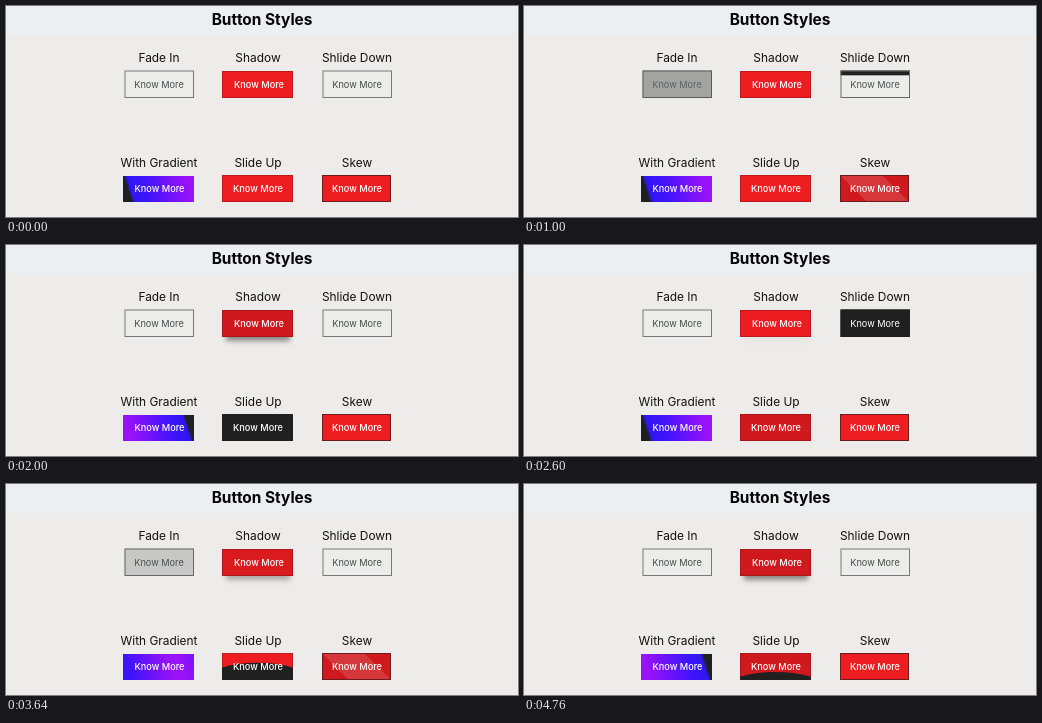
These frames come from a looping animation (512x211 px, 4800 ms). An HTML page with a canvas:

```html
<!DOCTYPE html>
<html lang="en">
<head>
<meta charset="utf-8">
<title>Button Styles</title>
<style>
  html, body { margin: 0; width: 100%; height: 100%; overflow: hidden; background: #edecea; }
  canvas { display: block; width: 512px; height: 211px; }
</style>
</head>
<body>
<canvas id="stage" width="512" height="211"></canvas>
<script>
const ctx = document.getElementById('stage').getContext('2d');
const LOOP = 4800;
const DARK = [31, 32, 31], PAPER = [236, 236, 234], INK = [72, 74, 76], WHITE = [255, 255, 255];
const RED = [237, 29, 33], DEEP_RED = [207, 25, 30], OUTLINE = [118, 121, 122];
const RED_EDGE = 'rgba(110,20,22,0.4)';

const clamp = v => Math.min(1, Math.max(0, v));
const ease = v => v * v * (3 - 2 * v);
const rgb = c => `rgb(${c.join(',')})`;
const mix = (a, b, p) => rgb(a.map((v, i) => Math.round(v + (b[i] - v) * p)));

// Progress of a hover transition; each visit is [enter, leave].
function hover(t, visits, fadeIn, fadeOut = fadeIn) {
  return Math.max(...visits.map(([enter, leave]) =>
    ease(clamp((t - enter) / fadeIn)) * (1 - ease(clamp((t - leave) / fadeOut)))));
}

function text(label, x, y, size, color, weight = 400) {
  ctx.font = `${weight} ${size}px Inter, "Open Sans", sans-serif`;
  ctx.textAlign = 'center';
  ctx.fillStyle = color;
  ctx.fillText(label, x, y);
}

const caption = (x, y, color, weight = 500) => text('Know More', x, y, 9.2, color, weight);

function box(x, y, w, h, fill, edge) {
  ctx.fillStyle = fill;
  ctx.fillRect(x, y, w, h);
  if (edge) border(x, y, w, h, edge);
}

function border(x, y, w, h, color) {
  ctx.strokeStyle = color;
  ctx.lineWidth = 1;
  ctx.strokeRect(x + 0.5, y + 0.5, w - 1, h - 1);
}

function clipped(x, y, w, h, paint) {
  ctx.save();
  ctx.beginPath();
  ctx.rect(x, y, w, h);
  ctx.clip();
  paint();
  ctx.restore();
}

function fadeButton(t) {
  const p = hover(t, [[880, 1650], [3560, 4260]], 300);
  box(118.5, 64.5, 69.5, 27.5, mix(PAPER, DARK, p), mix(OUTLINE, DARK, p));
  caption(153, 82, mix(INK, WHITE, p * p), 400);
}

function shadowButton(t) {
  const p = hover(t, [[1380, 2340], [3480, 5200]], 260, 310);
  ctx.save();
  ctx.shadowColor = `rgba(0,0,0,${0.42 * p})`;
  ctx.shadowBlur = 5;
  ctx.shadowOffsetY = 4;
  box(220, 70, 64, 22, rgb(RED));
  ctx.restore();
  box(216, 65, 71, 27, mix(RED, DEEP_RED, p), RED_EDGE);
  caption(253, 81.7, '#fff');
}

function slideDownButton(t) {
  const p = hover(t, [[937, 1280], [2280, 2740]], 240);
  box(316.5, 64.5, 69.5, 27.5, rgb(PAPER));
  box(316.5, 64.5, 69.5, 27.5 * p, rgb(DARK));
  border(316.5, 64.5, 69.5, 27.5, mix(OUTLINE, DARK, p));
  caption(351, 82, mix(INK, WHITE, p * p), 400);
}

function gradientButton(t) {
  const p = hover(t, [[1170, 2250], [3490, 5200]], 470, 300);
  const x = 117 - 71 * p, lean = 0.32;
  const reach = 142 * Math.cos(lean);
  // Mirrored bands, slanted so that the dark ends lean.
  const bands = [[0, '#1f2024'], [0.033, '#1f2024'], [0.055, '#3016f2'], [0.16, '#3d14fb'], [0.46, '#9a12f8']];
  const fill = ctx.createLinearGradient(
    x, 183, x + reach * Math.cos(lean), 183 - reach * Math.sin(lean));
  for (const [at, color] of bands) fill.addColorStop(at, color);
  for (const [at, color] of bands.slice().reverse()) fill.addColorStop(1 - at, color);
  box(117, 170, 71, 26, fill);
  caption(153.5, 186.2, '#fff');
}

function slideUpButton(t) {
  const visits = [[1390, 2330], [3510, 4585]];
  const rise = hover(t, visits, 240, 270);
  const tint = hover(t, visits.map(([a, b]) => [a + 120, b + 250]), 250);
  box(216, 169, 71, 27, mix(RED, DEEP_RED, tint), RED_EDGE);
  if (rise > 0) clipped(216, 169, 71, 27, () => {
    const top = 197 - 32 * rise;
    ctx.fillStyle = rgb(DARK);
    ctx.beginPath();
    ctx.ellipse(251.5, top + 16, 50, 16, 0, 0, Math.PI * 2);
    ctx.fill();
    ctx.fillRect(216, top + 16, 71, 30);
  });
  caption(252, 185.7, '#fff');
}

function skewButton(t) {
  const p = hover(t, [[720, 1660], [3400, 4330]], 240);
  box(316, 169, 69, 27, mix(RED, DEEP_RED, p));
  if (p > 0) clipped(316, 169, 69, 27, () => {
    const x = 316 - 70 * (1 - p);
    ctx.fillStyle = 'rgba(255,255,255,0.13)';
    ctx.beginPath();
    ctx.moveTo(x, 169);
    ctx.lineTo(x + 42, 169);
    ctx.lineTo(x + 69, 196);
    ctx.lineTo(x + 27, 196);
    ctx.fill();
  });
  border(316, 169, 69, 27, '#6b1c1e');
  caption(351, 186.2, '#fff');
}

function draw(t) {
  box(0, 0, 512, 211, '#edecea');
  box(0, 0, 512, 29, '#ebeff2');
  text('Button Styles', 256, 18.5, 15.4, '#050505', 700);
  ['Fade In', 'Shadow', 'Shlide Down'].forEach((s, i) => text(s, 153 + 99 * i, 55.5, 11.9, '#111'));
  ['With Gradient', 'Slide Up', 'Skew'].forEach((s, i) => text(s, 153 + 99 * i, 161, 11.9, '#111'));
  fadeButton(t);
  shadowButton(t);
  slideDownButton(t);
  gradientButton(t);
  slideUpButton(t);
  skewButton(t);
}

const start = performance.now();
function tick() {
  draw((performance.now() - start) % LOOP);
  requestAnimationFrame(tick);
}
tick();
</script>
</body>
</html>
```
